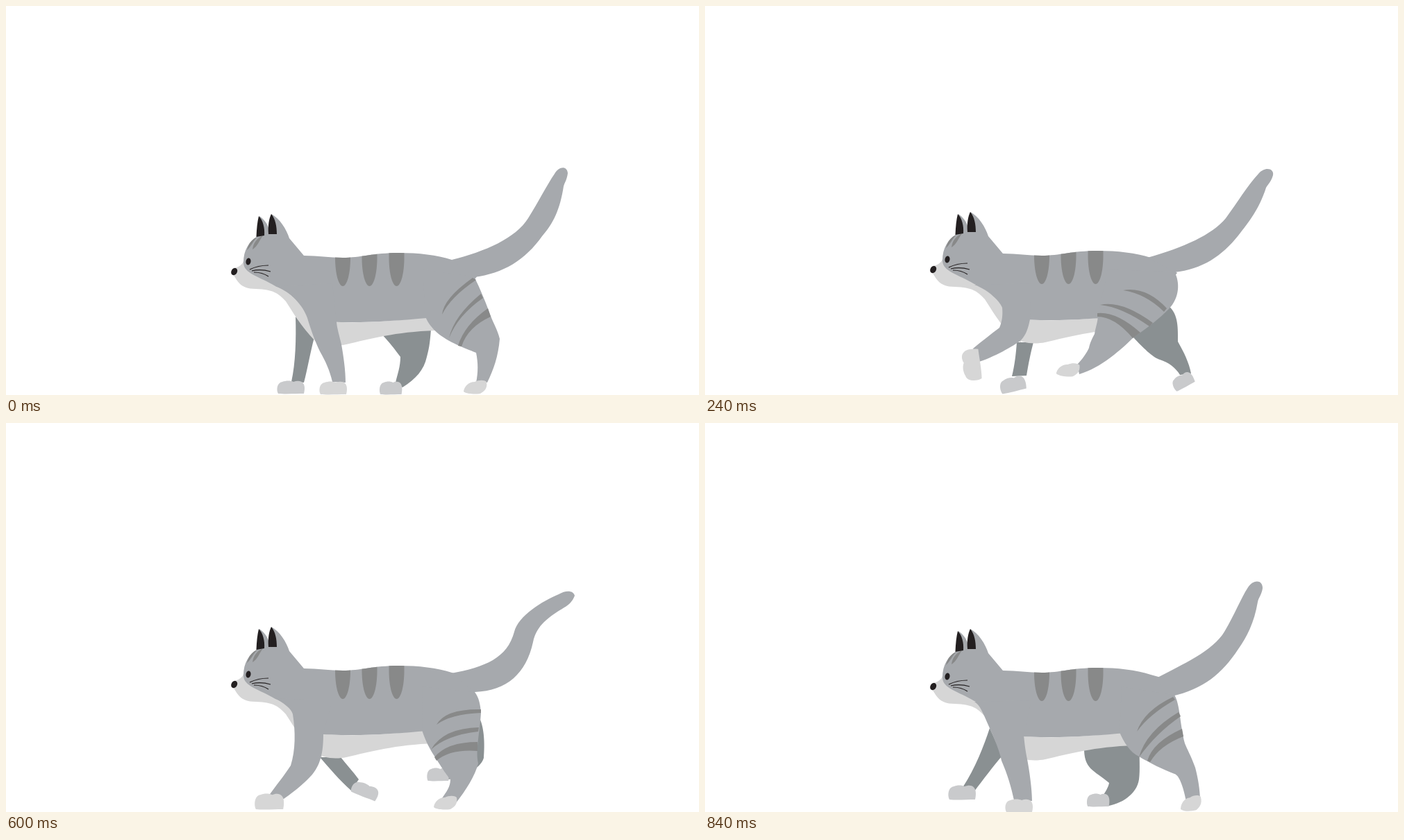
An HTML page with a canvas that plays this animation: 998x561 px, repeating every 960 ms.

```html
<!DOCTYPE html>
<html lang="en">
<head>
<meta charset="utf-8">
<title>Walking cat</title>
<style>
  html, body { margin: 0; width: 100%; height: 100%; overflow: hidden; background: #fff; }
  canvas { display: block; }
</style>
</head>
<body>
<canvas id="stage" width="998" height="561"></canvas>
<script>
const ctx = document.getElementById('stage').getContext('2d');
const STEP = 120;
const FUR = '#a6a9ad', FAR = '#8a9092', STRIPE = '#888989', WHITE = '#d6d6d6', FAR_PAW = '#c9cacc', BLACK = '#231f20';

// Parts that move with the body
const torso = new Path2D('M361 333C350 340 342 352 342 370C342 386 365 390 388 404C408 412 424 426 430 440L445 454C500 459 560 454 606 450L640 436L680 388L660 371L642 366C620 359 595 356 565 356C530 356 510 363 485 363C465 363 450 360 429 360L408 335C404 322 394 306 382 300L378 328L378 320C377 315 372 308 365 303Z');
const chest = 'M342 368C340 374 334 377 326 379L326 386C333 394 335 408 360 408C385 409 392 414 403 426C412 440 425 462 445 483L455 488L450 440L388 400Z';
const belly = 'M440 453C500 460 560 454 606 449L618 468C560 470 525 480 490 488C475 491 455 490 445 480Z';
const ears = 'M360.5 333C361 321 362 311 364 303C370 309 373 320 372 331ZM378 329C377 316 379 306 382 300C388 307 390 318 390 329Z';
const browStripes = 'M347 352C349 343 354 336 362 333C356 339 353 347 347 352ZM355 351C356 342 361 335 370 331C365 338 362 347 355 351Z';
const whiskers = 'M351 380Q363 374 378 374M354 382Q367 379 381 383M357 384Q369 384 378 390';

// Paws, centred on the origin with the toes to the left
const roundPaw = new Path2D('M-18 9C-21 4 -20 -7 -12 -8C-7 -10 0 -10 4 -8C9 -10 15 -10 18 -6C21 -2 20 5 19 9C8 9 -8 10 -18 9Z');
const hindPaw = new Path2D('M-17 6C-16 -2 -9 -8 -1 -8C5 -11 13 -11 16 -8C18 2 12 6 7 9C0 10 -12 10 -17 6Z');

// Paw values are x, y, angle, width and height; every part keeps the same commands in each pose, so poses can be blended
const poses = [
  {
    lift: '0',
    tail: 'M642 366C690 354 734 335 752 306C767 282 779 258 790 242C796 231 808 230 809 241C808 250 804 256 803 260C798 293 788 314 772 332C748 366 716 386 674 391Z',
    nearFore: 'M388 404C410 412 428 432 434 450C440 470 445 483 452 498C460 512 466 525 470 542L489 543C489 525 486 505 483 488C480 475 477 466 476 456L470 400Z',
    nearHind: 'M604 448C612 468 630 480 655 491C662 494 672 498 677 500C680 515 680 528 677 543L693 543C702 525 709 505 711 480C708 467 702 458 698 447C692 430 683 408 674 390L600 380Z',
    farFore: 'M417 448C418 480 417 515 411 542L429 543C434 525 438 500 444 478Z',
    farHind: 'M540 472C552 485 560 495 568 506C568 520 564 530 561 543L571 550C590 538 602 525 606 506C610 492 611 480 612 466Z',
    stripes: 'M628 445Q630 422 672 392L677 395Q640 420 628 445ZM638 479Q645 447 684 415L687 421Q650 447 638 479ZM651 490Q660 460 694 436L698 448Q665 463 656 491Z',
    paws: { nearFore: '471 551 0 1 1', nearHind: '676 550 0 1 1', farFore: '410 550 0 1 1', farHind: '554 551 0 .82 1' }
  },
  {
    lift: '2',
    tail: 'M637 368C690 355 733 338 746 306C756 282 763 254 772 237C777 222 792 222 793 236C793 244 790 249 790 255C791 292 784 310 770 332C748 367 716 387 675 392Z',
    nearFore: 'M388 406C400 413 425 442 440 465C448 478 452 484 458 490C472 505 484 520 494 532L511 524C508 508 500 492 495 483C487 470 482 464 479 458L470 400Z',
    nearHind: 'M602 452C608 468 620 482 633 495C645 506 652 509 655 511C655 520 648 528 640 538L655 544C675 532 690 512 698 497C698 488 693 490 692 480C687 445 688 410 676 392L600 380Z',
    farFore: 'M428 465C424 490 412 520 402 543L420 546C428 525 440 505 453 488Z',
    farHind: 'M604 468C618 485 630 500 638 512C637 520 637 528 634 536L648 536C654 525 656 515 655 508C658 500 655 470 650 460Z',
    stripes: 'M623 446Q635 417 682 405L683 411Q640 422 623 446ZM624 484Q637 447 685 430L686 438Q648 449 624 484ZM632 495Q645 466 687 455L689 469Q655 468 636 498Z',
    paws: { nearFore: '511 542 -110 1 1.15', nearHind: '640 542 0 1 1', farFore: '400 552 0 1 1', farHind: '634 553 0 .82 1' }
  },
  {
    lift: '-3',
    tail: 'M637 363C690 348 730 330 750 306C767 283 781 259 797 242C806 231 820 234 818 244C816 252 811 257 808 262C798 293 783 312 768 331C745 360 716 380 676 384Z',
    nearFore: 'M388 402C410 410 426 428 428 435C429 445 428 455 424 464C412 473 398 484 386 494L392 514C415 507 445 490 455 482C463 474 466 462 468 452L470 400Z',
    nearHind: 'M566 445C566 455 562 465 561 473C556 482 554 488 553 493C550 500 543 510 536 517L539 531C570 522 600 495 617 478C640 462 655 450 668 437C684 420 684 398 676 383L580 380Z',
    farFore: 'M449 485C448 500 446 518 442 534L463 533C466 515 469 500 473 485Z',
    farHind: 'M617 478C630 492 645 507 655 510C668 514 678 522 684 532L700 530C697 514 690 500 681 484C681 465 682 445 668 433Z',
    stripes: 'M602 410Q635 404 665 436L661 441Q635 415 602 410ZM569 431Q600 424 645 457L640 462Q600 434 569 431ZM565 443Q592 440 627 471L616 479Q590 448 565 448Z',
    paws: { nearFore: '384 518 -97 1.15 1.35', nearHind: '523 525 3 1 1', farFore: '443 546 -13 .95 1.1', farHind: '688 541 -28 .8 1' }
  },
  {
    lift: '2.5',
    tail: 'M637 369C690 356 727 340 745 312C759 286 785 272 806 264C818 258 829 261 829 269C826 277 820 282 812 286C794 298 779 315 767 334C747 367 720 388 675 393Z',
    nearFore: 'M388 406C400 413 412 420 415 427C419 450 419 475 412 492C403 505 390 520 380 532L401 541C415 532 428 523 434 521C455 515 460 475 459 455L470 400Z',
    nearHind: 'M587 452C591 463 593 480 596 490C600 500 604 508 606 512C603 524 597 535 586 544L588 553C612 540 632 527 640 526C650 517 648 512 655 493C668 462 698 410 676 392L600 380Z',
    farFore: 'M456 488C466 502 475 519 481 536L502 534C498 517 492 503 486 490Z',
    farHind: 'M654 493C664 494 672 497 678 501C682 504 686 507 689 510L705 508C702 492 696 478 690 470C686 464 681 462 681 425Z',
    stripes: 'M610 438Q630 421 680 432L680 437Q640 429 610 438ZM590 471Q615 450 673 457L670 464Q620 459 590 471ZM595 486Q618 470 659 479L657 490Q620 476 595 490Z',
    paws: { nearFore: '381 546 -13 1 1.1', nearHind: '573 551 0 1 1', farFore: '489 546 -10 .92 1.2', farHind: '690 518 -48 .75 1.15' }
  },
  {
    lift: '-6',
    tail: 'M641 361C690 352 722 339 732 301C738 278 772 257 796 247C806 241 817 241 819 249C816 257 811 262 804 266C783 279 764 291 759 316C749 361 722 386 675 388Z',
    nearFore: 'M388 397C400 404 411 412 413 420C417 445 417 472 410 494C401 508 388 524 378 538L400 542C420 528 432 517 441 507C455 490 457 470 457 447L470 400Z',
    nearHind: 'M599 443C604 458 610 470 618 482C625 493 636 510 640 514C640 525 634 532 628 541L648 548C662 530 676 508 680 491C676 470 682 450 684 418C683 405 681 396 675 388L600 380Z',
    farFore: 'M452 482C465 497 480 515 497 530L508 514C500 503 490 492 482 482Z',
    farHind: 'M665 430C655 460 655 480 650 497C645 499 640 500 632 502L636 514C655 512 683 500 688 483C689 470 690 445 683 428Z',
    stripes: 'M620 435Q633 412 684 413L684 418Q640 420 620 435ZM612 471Q630 440 681 439L680 445Q635 450 612 471ZM617 482Q635 460 679 460L679 473Q640 470 620 487Z',
    paws: { nearFore: '379 546 0 1.06 1.22', nearHind: '633 548 0 1 1', farFore: '517 530 22 1 1', farHind: '622 507 0 .8 1' }
  },
  {
    lift: '-3',
    tail: 'M648 369C690 347 731 329 748 301C763 276 771 254 782 237C790 225 803 226 803 238C802 247 797 252 796 258C791 288 780 309 768 326C745 361 718 384 672 394Z',
    nearFore: 'M388 402C395 406 398 414 402 422C412 445 424 470 427 487C436 508 441 525 445 544L471 545C471 528 467 500 464 485C461 470 460 460 459 450L470 400Z',
    nearHind: 'M597 446C603 460 612 475 625 481C640 490 660 500 676 506C684 508 690 530 693 546L713 541C712 520 708 505 706 497C700 480 694 470 691 462C684 435 684 405 676 392L600 380Z',
    farFore: 'M410 440C402 465 388 500 372 524L388 531C400 515 415 495 428 480Z',
    farHind: 'M546 466C545 500 560 500 582 519C581 526 576 532 572 540L576 553C600 550 622 535 625 514C627 500 625 480 626 464Z',
    stripes: 'M622 445Q632 415 674 395L677 399Q640 420 622 445ZM625 482Q635 445 682 417L685 423Q650 447 625 482ZM637 487Q645 460 687 441L689 452Q655 465 641 489Z',
    paws: { nearFore: '452 552 0 1 1', nearHind: '700 549 -5 .92 1.1', farFore: '370 533 0 1 1.1', farHind: '566 544 0 .82 1' }
  }
];

function blend(a, b) {
  if (typeof a === 'object') {
    return Object.fromEntries(Object.keys(a).map(key => [key, blend(a[key], b[key])]));
  }
  const other = b.match(/-?[\d.]+/g);
  let i = 0;
  return a.replace(/-?[\d.]+/g, n => (+n + +other[i++]) / 2);
}

const cycle = [
  poses[0], poses[1], poses[2], blend(poses[2], poses[3]),
  poses[3], poses[4], blend(poses[4], poses[5]), poses[5]
];

function fill(path, color) {
  ctx.fillStyle = color;
  ctx.fill(typeof path === 'string' ? new Path2D(path) : path);
}

function ellipse(x, y, rx, ry, angle) {
  ctx.beginPath();
  ctx.ellipse(x, y, rx, ry, angle, 0, 2 * Math.PI);
  ctx.fillStyle = BLACK;
  ctx.fill();
}

function paw(shape, place, color) {
  const [x, y, angle, width, height] = place.split(' ').map(Number);
  ctx.save();
  ctx.translate(x, y);
  ctx.rotate(angle * Math.PI / 180);
  ctx.scale(width, height);
  fill(shape, color);
  ctx.restore();
}

function withLift(lift, draw) {
  ctx.save();
  ctx.translate(0, lift);
  draw();
  ctx.restore();
}

function drawBody() {
  fill(chest, WHITE);
  fill(belly, WHITE);
  fill(torso, FUR);
}

function drawMarkings() {
  ctx.save();
  ctx.clip(torso);
  for (const x of [485, 523.5, 562.5]) {
    fill(`M${x - 11} 350L${x + 11} 350L${x + 11} 363C${x + 11} 386 ${x + 6} 404 ${x} 404C${x - 6} 404 ${x - 11} 386 ${x - 11} 363Z`, STRIPE);
  }
  ctx.restore();
  fill(browStripes, STRIPE);
  fill(ears, BLACK);
  ellipse(349, 368.5, 3.5, 5, 0.2);
  ellipse(328.7, 383, 4.2, 5.5, 0.5);
  ctx.strokeStyle = BLACK;
  ctx.lineWidth = 1.2;
  ctx.stroke(new Path2D(whiskers));
}

function drawCat(pose) {
  const { paws } = pose;
  ctx.clearRect(0, 0, 998, 561);
  fill(pose.farFore, FAR);
  fill(pose.farHind, FAR);
  paw(roundPaw, paws.farFore, FAR_PAW);
  paw(roundPaw, paws.farHind, FAR_PAW);
  withLift(+pose.lift, drawBody);
  for (const part of ['tail', 'nearFore', 'nearHind']) fill(pose[part], FUR);
  fill(pose.stripes, STRIPE);
  withLift(+pose.lift, drawMarkings);
  paw(roundPaw, paws.nearFore, WHITE);
  paw(hindPaw, paws.nearHind, WHITE);
}

const start = performance.now();
function tick() {
  const step = Math.floor((performance.now() - start) / STEP) % cycle.length;
  drawCat(cycle[step]);
  requestAnimationFrame(tick);
}
tick();
</script>
</body>
</html>
```
